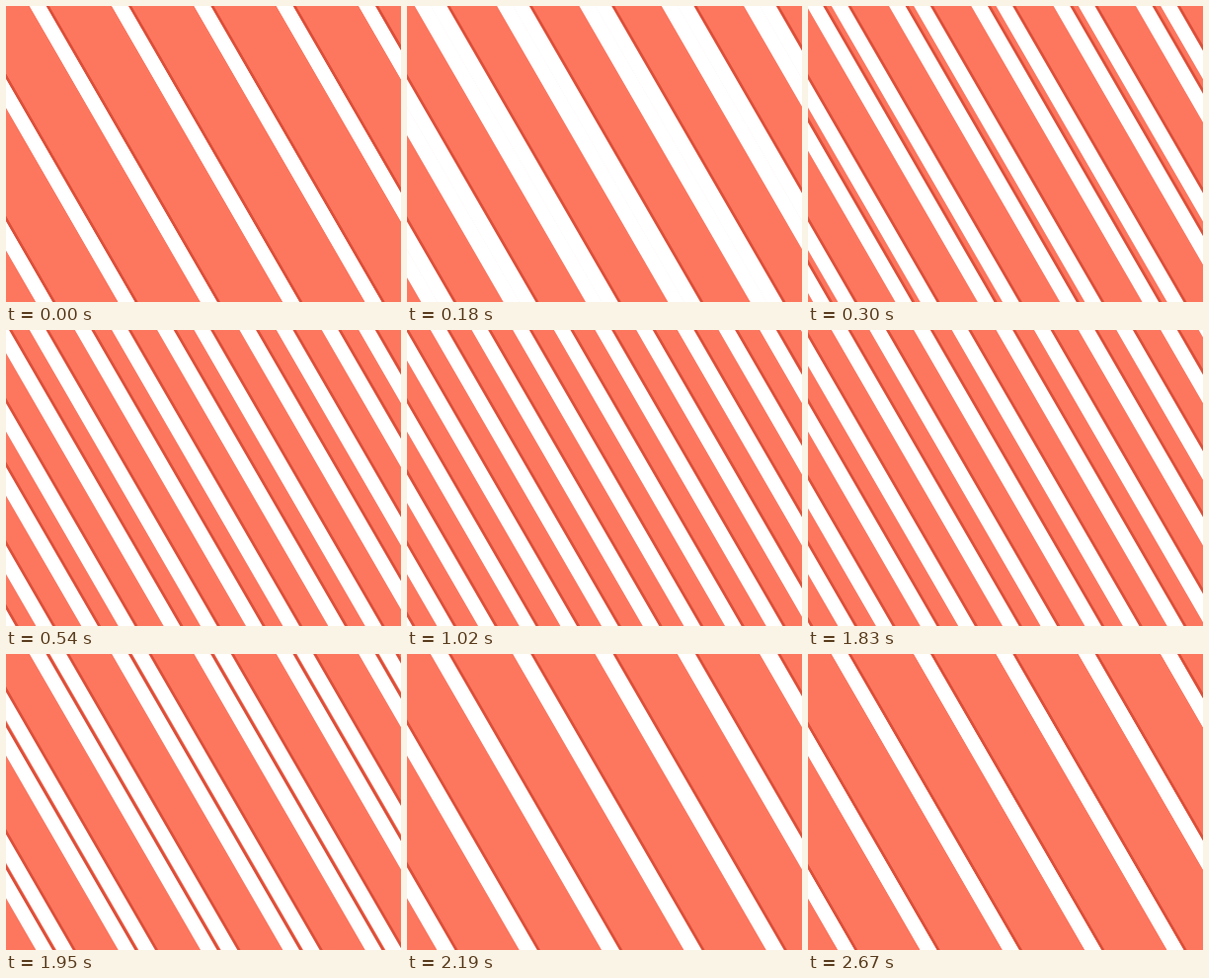
An HTML page with a canvas for the animation above (3.3 s loop, 400 by 300 pixels).

```html
<!DOCTYPE html>
<html lang="en">
<head>
<meta charset="utf-8">
<title>Sliding stripes</title>
<style>
  html, body { margin: 0; width: 100%; height: 100%; overflow: hidden; background: #fd765e; }
  canvas { display: block; }
</style>
</head>
<body>
<canvas id="stage" width="400" height="300"></canvas>
<script>
const LOOP = 3300, STEP = 30, LAST = 2670;
const PERIOD = 250 / 3, WIDTH = PERIOD / 5, EDGE = 3.2, START = 23.8;
const LEAN = 300 / Math.sqrt(3);
const RED = '#fd765e', SHADE = '#dc4f39', WHITE = '#fff';

const pen = document.getElementById('stage').getContext('2d');

// Quick start, long soft landing.
function ease(x) {
  x = Math.min(1, Math.max(0, x));
  return 1 - (1 - x) ** 3 * (1 + x);
}

// The moving set slides left by half a period, rests, then slides on to merge.
function slide(t) {
  return PERIOD / 2 * (ease(t / 900) + ease((t - 1810) / 520));
}

function stripes(offset, width, color) {
  pen.fillStyle = color;
  pen.beginPath();
  for (let k = -4; k < 7; k++) {
    const x = START + k * PERIOD + offset;
    pen.moveTo(x, 0);
    pen.lineTo(x + width, 0);
    pen.lineTo(x + width + LEAN, 300);
    pen.lineTo(x + LEAN, 300);
    pen.closePath();
  }
  pen.fill();
}

function draw(t) {
  const offsets = [0, -slide(t)];
  pen.fillStyle = RED;
  pen.fillRect(0, 0, 400, 300);
  for (const x of offsets) stripes(x, WIDTH + EDGE, SHADE);
  for (const x of offsets) stripes(x, WIDTH, WHITE);
}

function frame() {
  const t = performance.now() % LOOP;
  draw(Math.min(LAST, Math.floor(t / STEP) * STEP));
  requestAnimationFrame(frame);
}
frame();
</script>
</body>
</html>
```
